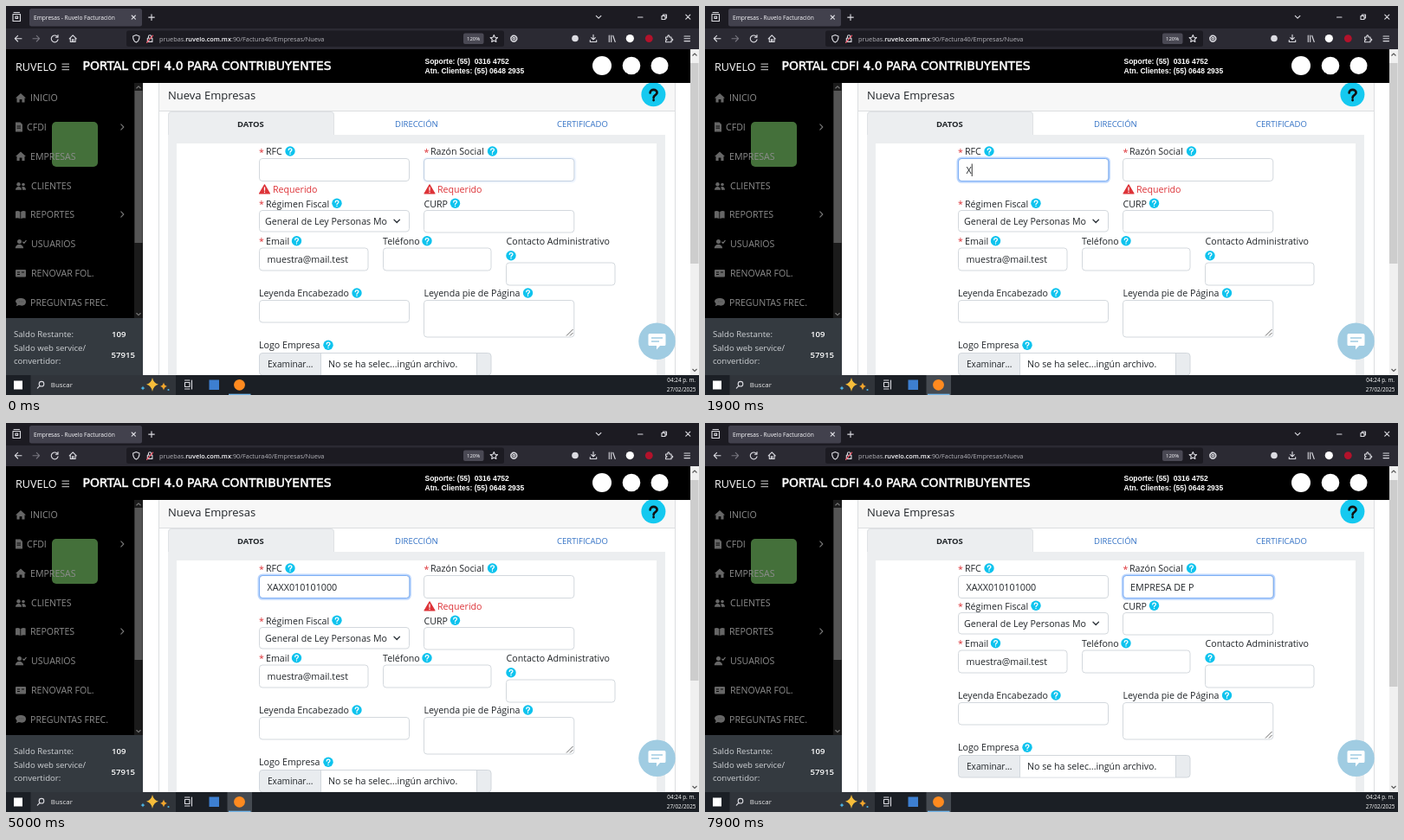
Animation, 800 px wide and 450 px high, one loop 8 s. Source, as an HTML page:

```html
<!DOCTYPE html>
<html lang="es">
<head>
<meta charset="utf-8">
<title>Nueva Empresas</title>
<style>
  html, body { margin: 0; width: 100%; height: 100%; overflow: hidden; background: #fff; }
  svg { display: block; width: 100vw; height: 100vh; }
  text { font-family: "Open Sans", "Noto Sans", sans-serif; font-size: 10.65px; fill: #212529; white-space: pre; }
  .line { fill: none; stroke: #dcdce2; stroke-width: 1.1; stroke-linecap: round; stroke-linejoin: round; }
  .field { fill: #fff; stroke: #ced4da; stroke-width: .9; }
  .red { fill: #dd3338; }
  .side text { fill: #8d8d8d; font-size: 10.6px; }
  .side .ic { fill: #666; }
  .side .line { stroke: #777; }
  .tab { font-size: 9.5px; fill: #2f6fc4; }
  .light { fill: #fbfbfe; }
  .head { font: bold 8.5px "Liberation Sans", Arial, sans-serif; fill: #fff; }
  .saldo { font-size: 9.6px; fill: #cfd2d5; }
  .num { font-size: 9.6px; font-weight: 600; fill: #fff; }
  .clock { font-size: 6.35px; fill: #fff; text-anchor: end; }
  .glow rect { fill: none; }
</style>
</head>
<body>
<svg viewBox="0 0 800 450">
  <defs>
    <g id="help">
      <circle r="5.7" fill="#0dc3ee"/>
      <path d="M-1.8-1.3c0-2.5 3.7-2.3 3.7-.2C1.9 0 0-.2 0 1.3M0 3v.3" fill="none" stroke="#fff" stroke-width="1.3" stroke-linecap="round"/>
    </g>
    <g id="warn">
      <path d="M0-5.2 6 5H-6Z" fill="#dd3338" stroke="#dd3338" stroke-width="1.2" stroke-linejoin="round"/>
      <path d="M0-2v3.2M0 3.2v.3" stroke="#fff" stroke-width="1.3" stroke-linecap="round"/>
    </g>
    <path id="house" d="M0-5.5 6 0H4.5v5H1.4V1.5h-2.8V5H-4.5V0H-6Z"/>
    <g id="users">
      <circle cx="-2.5" cy="-2.3" r="2.2"/><circle cx="3" cy="-2" r="1.8"/>
      <path d="M-6 4.3c0-5 7-5 7 0ZM2 4.3c0-1.5-.4-2.5-1-3.2 2-1.6 5-.4 5 3.2Z"/>
    </g>
    <clipPath id="page"><rect x="158" y="89" width="632" height="338"/></clipPath>
  </defs>

  <!-- page -->
  <rect width="800" height="450" fill="#fff"/>
  <g clip-path="url(#page)">
    <path d="M176.5 89v340M772.5 89v340" stroke="#dcdee0"/>
    <rect x="177" y="89" width="595" height="32" fill="#f7f7f7"/>
    <path d="M176 121.5h597" stroke="#dcdee0"/>
    <text x="187" y="107.7" style="font-size:13px">Nueva Empresas</text>
    <path d="M187 149v-23q0-4 4-4h184q4 0 4 4v23h382v280H187Z" fill="#eceef0"/>
    <path d="M187.5 149v-23q0-3.5 3.5-3.5h184q3.5 0 3.5 3.5v23" fill="none" stroke="#dfe2e5"/>
    <rect x="197" y="159" width="554" height="270" fill="#fff"/>
    <text x="267" y="139.8" class="tab" style="fill:#212529;font-weight:700">DATOS</text>
    <text x="449" y="139.8" class="tab">DIRECCIÓN</text>
    <text x="636" y="139.8" class="tab">CERTIFICADO</text>

    <text x="292" y="172.5" class="red">*</text><text x="300" y="172.3">RFC</text>
    <use href="#help" x="328" y="168"/>
    <text x="482.5" y="172.5" class="red">*</text><text x="490" y="172.3">Razón Social</text>
    <use href="#help" x="561.5" y="168"/>
    <rect class="field" x="292.5" y="176.5" width="173" height="26" rx="3.5"/>
    <rect class="field" x="482.5" y="176.5" width="173.3" height="26" rx="3.5"/>
    <g id="glowA" class="glow">
      <rect x="291.7" y="175.6" width="175" height="28" rx="4.5" stroke="#bcd6fd" stroke-width="2.4"/>
      <rect x="292.5" y="176.5" width="173.5" height="26" rx="3.5" stroke="#7fb0f5"/>
    </g>
    <g id="glowB" class="glow">
      <rect x="482" y="175.6" width="175.2" height="28" rx="4.5" stroke="#bcd6fd" stroke-width="2.4"/>
      <rect x="482.8" y="176.5" width="173.6" height="26" rx="3.5" stroke="#7fb0f5"/>
    </g>
    <text id="rfc" x="301.5" y="193.8" style="font-size:10.75px"></text>
    <text id="razon" x="491" y="193.8" style="font-size:10.75px"></text>
    <rect id="caret" y="182.5" width="1" height="14.5" fill="#333"/>

    <g id="warnA"><use href="#warn" x="298.5" y="212"/><text x="308" y="216" class="red">Requerido</text></g>
    <g id="warnB"><use href="#warn" x="489" y="212"/><text x="498" y="216" class="red">Requerido</text></g>

    <g id="rest">
      <text x="292" y="233" class="red">*</text><text x="300" y="232.8">Régimen Fiscal</text>
      <use href="#help" x="382" y="228.3"/>
      <text x="482.5" y="232.8">CURP</text><use href="#help" x="518.5" y="228.3"/>
      <rect class="field" x="292.5" y="236.5" width="173" height="24.5" rx="3.5"/>
      <text x="299" y="253">General de Ley Personas Mo</text>
      <path d="M448 247.3l3.2 3.2 3.2-3.2" fill="none" stroke="#343a40" stroke-width="1.4" stroke-linecap="round"/>
      <rect class="field" x="482.5" y="236.5" width="173.3" height="25.5" rx="3.5"/>

      <text x="292" y="276.3" class="red">*</text><text x="300" y="276.1">Email</text>
      <use href="#help" x="335.5" y="271.8"/>
      <text x="435" y="276.1">Teléfono</text><use href="#help" x="486" y="271.8"/>
      <text x="577.5" y="276.1">Contacto Administrativo</text><use href="#help" x="583" y="288.7"/>
      <rect class="field" x="292.5" y="280" width="125.5" height="26" rx="3.5"/>
      <text x="301.5" y="297.3">muestra@mail.test</text>
      <rect class="field" x="435.5" y="280" width="124.5" height="26" rx="3.5"/>
      <rect class="field" x="577.5" y="297" width="125.5" height="26" rx="3.5"/>

      <text x="292" y="336.3">Leyenda Encabezado</text><use href="#help" x="405" y="332"/>
      <text x="482.5" y="336.3">Leyenda pie de Página</text><use href="#help" x="602.5" y="332"/>
      <rect class="field" x="292.5" y="340.5" width="173" height="25.5" rx="3.5"/>
      <rect class="field" x="482.5" y="340.5" width="173.3" height="42.5" rx="3.5"/>
      <path d="M647 381.5l7.5-7.5M651 381.5l3.5-3.5" stroke="#555" stroke-width=".9"/>

      <text x="292" y="396.3">Logo Empresa</text><use href="#help" x="372" y="392.3"/>
      <rect class="field" x="292.5" y="401.5" width="267.5" height="25.5" rx="3.5" style="fill:#e9ecef"/>
      <rect x="363" y="402" width="180" height="24.6" fill="#fff"/>
      <path d="M363.5 401.5v25.5M543.5 401.5v25.5" stroke="#ced4da" stroke-width=".9"/>
      <text x="302" y="418" style="font-size:10.1px">Examinar...</text>
      <text x="372" y="418">No se ha selec...ingún archivo.</text>
      <text x="296" y="451.6" style="font-weight:600">Validación de la empresa</text>
    </g>

    <circle cx="747.4" cy="102.3" r="14" fill="#15c9f0"/>
    <path d="M743.6 100.5c0-5 8-4.7 8-.2 0 3-4 2.6-4 5.6M747.6 108.7v.4" fill="none" stroke="#111" stroke-width="2.7" stroke-linecap="round"/>
    <circle cx="751.5" cy="387.7" r="21.3" fill="#a0cce2"/>
    <path d="M743 379h17q1.5 0 1.5 1.5v11q0 1.5-1.5 1.5h-5l-4 4.5V393h-8q-1.5 0-1.5-1.5v-11q0-1.5 1.5-1.5Z" fill="#fff"/>
    <path d="M745 384h13M745 388h9" stroke="#a0cce2" stroke-width="1.5"/>
  </g>
  <path id="beam" d="M-2.2-5h1.6L0-4.4.6-5h1.6M0-4.4v8.8M-2.2 5h1.6L0 4.4.6 5h1.6" fill="none" stroke="#555" stroke-width=".9"/>

  <!-- page scrollbar -->
  <rect x="790" y="50" width="10" height="377" fill="#f0f0f0"/>
  <rect id="thumb" x="790" y="66" width="9.5" height="232" fill="#cdcdcd"/>
  <path d="M792.5 57.5l2.5-2.5 2.5 2.5M792.5 420l2.5 2.5 2.5-2.5" fill="none" stroke="#555" stroke-width="1.1"/>

  <!-- site header -->
  <rect y="50" width="790" height="39" fill="#000"/>
  <text x="11" y="75" style="font-size:12.6px;fill:#fff">RUVELO</text>
  <path d="M64.5 67.2h8.5M64.5 70.4h8.5M64.5 73.6h8.5" stroke="#aaa" stroke-width="1.3"/>
  <text x="88.5" y="74" style="font:13.9px 'DejaVu Sans',sans-serif;fill:#fff;stroke:#fff;stroke-width:.5px">PORTAL CDFI 4.0 PARA CONTRIBUYENTES</text>
  <text x="483.5" y="66.8" class="head">Soporte: (55)  0316 4752</text>
  <text x="483.5" y="77.6" class="head">Atn. Clientes: (55) 0648 2935</text>
  <g fill="#fff"><circle cx="688" cy="69" r="11"/><circle cx="722" cy="69" r="10.3"/><circle cx="754.5" cy="69" r="10"/></g>

  <!-- sidebar -->
  <g class="side">
    <rect y="89" width="158" height="272" fill="#000"/>
    <rect x="53" y="134" width="53" height="52" rx="5" fill="#44703a"/>
    <rect x="148" y="89" width="10" height="272" fill="#1b1b1b"/>
    <rect x="148.5" y="98" width="9" height="176" fill="#555"/>
    <path class="line" d="M150.8 95l2.2-2.2 2.2 2.2M150.8 355.5l2.2 2.2 2.2-2.2M132.8 136.8l3 3.2-3 3.2M132.8 237.8l3 3.2-3 3.2"/>
    <g class="ic">
      <use href="#house" x="17" y="106.5"/>
      <path d="M11 134.5h5.5l2.5 2.5v8.5h-8Z"/>
      <use href="#house" x="17" y="174"/>
      <use href="#users" x="17" y="208.5"/>
      <path d="M11 237.5q3-1 5.4.5v8q-2.4-1.2-5.4-.6ZM22.6 237.5q-3-1-5.4.5v8q2.4-1.2 5.4-.6Z"/>
      <circle cx="15.5" cy="272.5" r="2.5"/><path d="M10.8 280.3c0-6 9-6 9.4 0Z"/>
      <rect x="11" y="305" width="12" height="8.5" rx="1"/>
      <path d="M11 342c0-5.5 12-5.5 12 0s-6 5-8 4l-3.3 1.3.9-2.7Z"/>
    </g>
    <path class="line" d="M19.5 273l1.3 1.4 2.4-3"/>
    <path d="M12.5 139h4.5M12.5 141.2h4.5M13 308h3M13 310.5h3M18 308h3M15 342h.3M17 342h.3M19 342h.3" stroke="#000" stroke-width=".9"/>
    <text x="28" y="110.3">INICIO</text>
    <text x="24" y="144.3">CFDI</text>
    <text x="28" y="178">EMPRESAS</text>
    <text x="29" y="212">CLIENTES</text>
    <text x="28" y="245.3">REPORTES</text>
    <text x="29" y="279.3">USUARIOS</text>
    <text x="29" y="313.2">RENOVAR FOL.</text>
    <text x="28" y="347">PREGUNTAS FREC.</text>
  </g>
  <rect y="361" width="158" height="66" fill="#343a40"/>
  <text x="9" y="382.5" class="saldo">Saldo Restante:</text>
  <text x="9" y="399" class="saldo">Saldo web service/</text>
  <text x="9" y="413.5" class="saldo">convertidor:</text>
  <text x="122" y="382.5" class="num">109</text>
  <text x="121.5" y="407" class="num">57915</text>

  <!-- browser -->
  <rect width="800" height="27" fill="#1c1b22"/>
  <rect y="26" width="800" height="24" fill="#2b2a33"/>
  <rect x="27" y="3" width="130" height="20.5" rx="2.5" fill="#42414d"/>
  <text x="32" y="15.8" class="light" style="font-size:6.6px">Empresas - Ruvelo Facturación</text>
  <rect x="139" y="28.5" width="436" height="18.5" rx="2.5" fill="#1c1b22"/>
  <text x="177" y="40.8" style="font-size:7.35px;fill:#b4b4ba">pruebas.<tspan font-weight="600" fill="#fbfbfe">ruvelo.com.mx</tspan>:90/Factura40/Empresas/Nueva</text>
  <rect x="528" y="31.5" width="23.5" height="12.5" rx="2" fill="#4a4954"/>
  <text x="532" y="40" class="light" style="font-size:6px">120%</text>
  <g class="line">
    <path d="M8 9.5h8.5v8H8ZM9 7.5h6.5M11 12h2.6v2.4H11Z"/>
    <path d="M145.2 11l4.2 4.2M149.4 11l-4.2 4.2M168 9.8v6.6M164.7 13.1h6.6M681.3 11.3l2.8 2.8 2.8-2.8M729.5 13h5.5M784.8 10.2l5 5M789.8 10.2l-5 5"/>
    <path d="M757 11.5h4v4h-4ZM758.5 11.5V10h4v4H761"/>
    <path d="M18 37.7h-7.6M13.6 34.4l-3.3 3.3 3.3 3.3M59 35.2a3.9 3.9 0 1 0 1 3.6M60 33.6v2.6h-2.6"/>
    <path d="M31 37.7h7.6M35.3 34.4l3.3 3.3-3.3 3.3" stroke="#77767f"/>
    <path d="M73.2 37.8l4-4 4 4M74.3 37v4.5h5.8V37M76.4 41.3v-2.6h1.6v2.6"/>
    <path d="M150.3 33.6l3.7 1.3c0 4-1 5.8-3.7 7.2-2.7-1.4-3.7-3.2-3.7-7.2Z"/>
    <path d="M163.3 37.2h5.6v4.2h-5.6ZM164.4 37v-1.6a1.7 1.7 0 0 1 3.4 0V37"/>
    <path d="M162.6 42.3l7-8.2" stroke="#ff5a6d"/>
    <path d="M563.3 33.5l1.2 2.7 3 .3-2.2 2 .6 2.9-2.6-1.5-2.6 1.5.6-2.9-2.2-2 3-.3Z"/>
    <circle cx="586.3" cy="37.7" r="1.3"/><circle cx="586.3" cy="37.7" r="3.4" stroke-width="1.6" stroke-dasharray="1.5 1.17"/>
    <path d="M678 33.3v5.4M675.7 36.6l2.3 2.3 2.3-2.3M674.3 39.5v2h7.4v-2M696.3 34v7.5M698.7 34v7.5M700.7 34.3l2.5 7.2"/>
    <path d="M761.6 36h2.2c-.7-2.8 2.7-2.8 2 0h2.2v2.1c2.3-.6 2.3 2.3 0 1.7v1.9h-6.4v-2c1.9 0 1.9-1.7 0-1.7ZM783 35h6.5M783 37.8h6.5M783 40.6h6.5"/>
  </g>
  <circle cx="657" cy="37.5" r="3.8" fill="#dcdce2"/>
  <circle cx="720.3" cy="37.6" r="4.6" fill="#fff"/>
  <circle cx="742.3" cy="37.6" r="4.4" fill="#b3122b"/>

  <!-- taskbar -->
  <rect y="427" width="800" height="23" fill="#1b1f25"/>
  <rect x="9" y="433.5" width="10" height="10" fill="#fff"/>
  <rect x="28.5" y="427" width="167.5" height="23" fill="#30343a"/>
  <g class="line">
    <circle cx="41" cy="437.2" r="2.8"/><path d="M39 439.3l-2.7 2.9"/>
    <path d="M206.5 435.5h5.5v5h-5.5ZM206.5 433h5.5M206.5 443h5.5M214.5 433v10M214.5 436v1"/>
  </g>
  <text x="51.8" y="441.3" style="font-size:7.9px;fill:#e8e8e8">Buscar</text>
  <path d="M169 430q1.2 6.2 7 7.8-5.8 1.6-7 8.2-1.2-6.6-7-8.2 5.8-1.6 7-7.8Z" fill="#f7bd3a"/>
  <path d="M182 435.5q.7 3.6 4 4.4-3.3.8-4 4.6-.7-3.8-4-4.6 3.3-.8 4-4.4Z" fill="#f2a52c"/>
  <path d="M158 439.5q.4 2 2.5 2.5-2.1.5-2.5 2.6-.4-2.1-2.5-2.6 2.1-.5 2.5-2.5Z" fill="#4db6e8"/>
  <circle cx="187.5" cy="444" r="1.1" fill="#4db6e8"/>
  <rect x="234.5" y="432.5" width="11.5" height="11.5" fill="#3d7fd0"/>
  <rect id="active" x="255.5" y="427" width="28.5" height="23" fill="#454a51"/>
  <rect x="257" y="448.7" width="25.5" height="1.3" fill="#76b9ed"/>
  <circle cx="269.5" cy="438.3" r="6.4" fill="#ff8a1f"/>
  <text x="796" y="435.3" class="clock">04:24 p. m.</text>
  <text x="796.5" y="445.8" class="clock">27/02/2025</text>
</svg>
<script>
  const LOOP = 8000, FOCUS_A = 1050, FOCUS_B = 5150, FADE = 150;
  const el = id => document.getElementById(id);
  const [rfc, razon, caret, beam, rest, warnA, warnB, glowA, glowB, thumb, active] =
    ['rfc', 'razon', 'caret', 'beam', 'rest', 'warnA', 'warnB', 'glowA', 'glowB', 'thumb', 'active'].map(el);
  const ramp = (t, from, len) => Math.min(1, Math.max(0, (t - from) / len));
  const show = (node, on) => node.setAttribute('visibility', on ? 'visible' : 'hidden');

  // Each character appears at its own key time.
  const typing = (text, start, step) => ({ text, keys: [...text].map((_, i) => start + i * step) });
  const first = typing('XAXX010101000', 1800, 265);
  const second = typing('EMPRESA DE P', 5340, 180);
  second.keys[11] = 7840;

  function type(node, { text, keys }, t) {
    const n = keys.filter(k => k <= t).length;
    node.textContent = text.slice(0, n);
    return n ? keys[n - 1] : 0;
  }

  function draw(t) {
    const lastA = type(rfc, first, t), lastB = type(razon, second, t);
    const inB = t >= FOCUS_B, filled = lastB > 0;

    glowA.setAttribute('opacity', ramp(t, FOCUS_A, FADE) - ramp(t, FOCUS_B, FADE));
    glowB.setAttribute('opacity', Math.max(.2 * (1 - ramp(t, 0, 100)), ramp(t, FOCUS_B, FADE)));
    show(active, t >= FOCUS_A);
    show(warnA, !lastA);
    show(warnB, !filled);
    // With no warnings left the form moves up and the page gets shorter.
    rest.setAttribute('transform', `translate(0 ${filled ? -17 : 0})`);
    thumb.setAttribute('height', filled ? 239 : 232);

    // The caret lags a repaint behind each key, then blinks.
    const node = inB ? razon : rfc;
    const age = t - Math.max(inB ? FOCUS_B : FOCUS_A, inB ? lastB : lastA);
    show(caret, t >= FOCUS_A && age >= 80 && age % 1000 < 580);
    caret.setAttribute('x', +node.getAttribute('x') + (node.textContent ? node.getComputedTextLength() : 0));

    const p = 1 - (1 - ramp(t, 400, 350)) ** 2;
    beam.setAttribute('transform', `translate(${430 - 41 * p} ${215 - 25 * p})`);
    show(beam, t >= 400 && !lastA);
  }

  const begin = performance.now();
  function tick() {
    draw((performance.now() - begin) % LOOP);
    requestAnimationFrame(tick);
  }
  tick();
</script>
</body>
</html>
```
